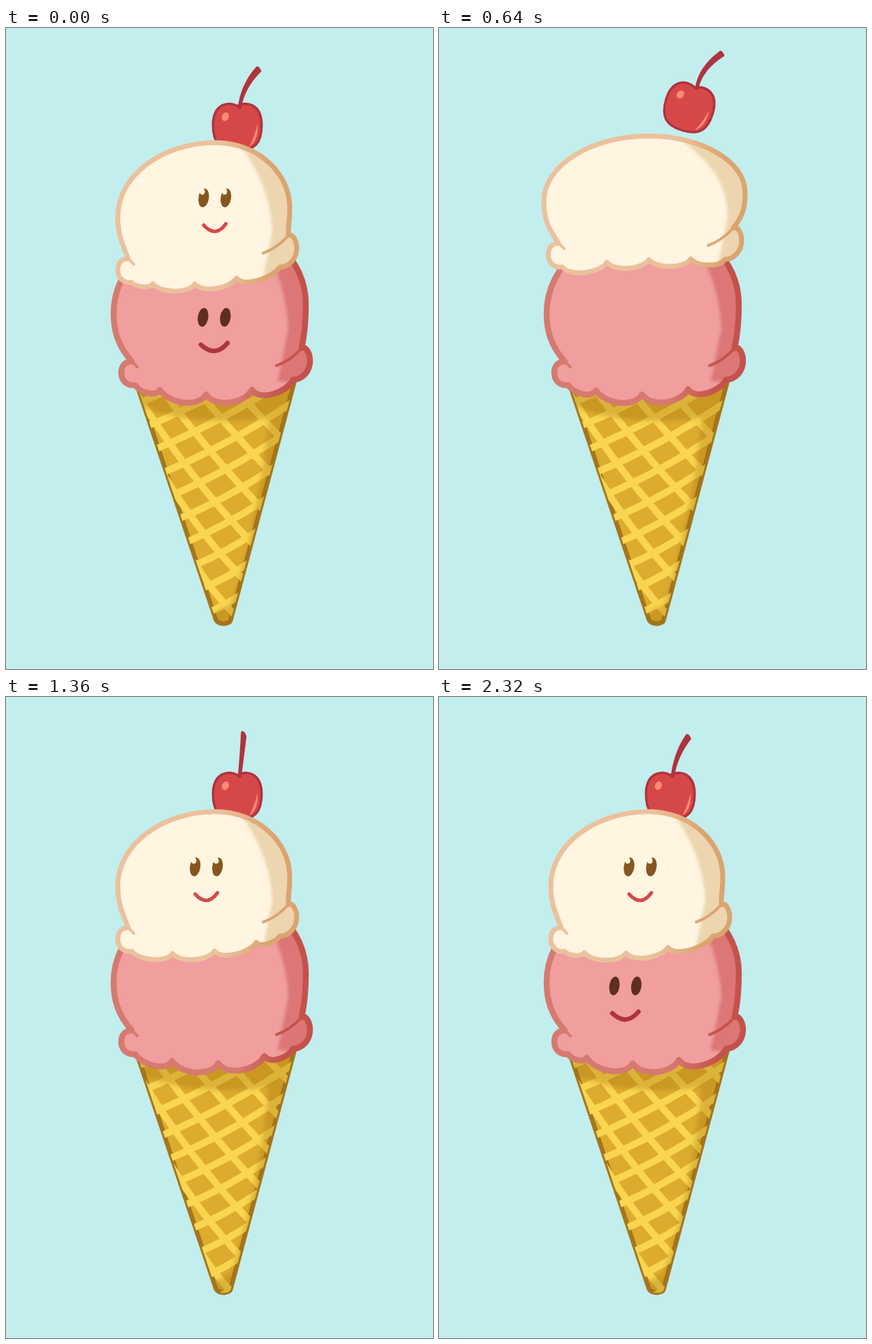
These frames come from a looping animation (611 by 917 pixels, 2400 ms). An HTML page with a canvas:

```html
<!DOCTYPE html>
<html lang="en">
<head>
<meta charset="utf-8">
<title>Ice cream</title>
<style>
html, body { margin: 0; width: 100%; height: 100%; overflow: hidden; background: #c2eeee; }
canvas { display: block; }
</style>
</head>
<body>
<canvas id="c" width="611" height="917"></canvas>
<script>
const ctx = document.getElementById('c').getContext('2d');
const STEP = 80, COUNT = 30, TAU = Math.PI * 2;

const VANILLA = {
  fill: '#fff5e1', shade: '#ecd5af', line: '#ebc19c', dark: '#dba46f',
  eye: '#86561f', lip: '#d64848', glint: true, spacing: 60, dip: 0.2, width: 7
};
const BERRY = {
  fill: '#f09e9e', shade: '#dc7677', line: '#d67a70', dark: '#c4524b',
  eye: '#5f2e21', lip: '#ae343f', glint: false, spacing: 66, dip: 0.26, width: 8.5
};

// Poses of the hop: step, sideways spread, drift to the right, lift
const HOP = [
  [0, 0, 0, 0], [3, 30, 4, -30], [5, 8, 19, 43],
  [8, 21, 11, 22], [9, 22, 6, -6], [12, 0, 0, 0], [COUNT, 0, 0, 0]
];

function ease(a, b, n) {
  const u = Math.min(1, Math.max(0, (n - a) / (b - a)));
  return u * u * (3 - 2 * u);
}

const bump = (n, center, width) => Math.exp(-(((n - center) / width) ** 2));

function hopAt(n) {
  const i = HOP.findIndex(key => key[0] > n), a = HOP[i - 1], b = HOP[i];
  const u = ease(a[0], b[0], n);
  return a.slice(1).map((v, k) => v + (b[k + 1] - v) * u);
}

function twoTone(look, x) {
  const g = ctx.createLinearGradient(x - 30, 0, x + 40, 0);
  g.addColorStop(0, look.line);
  g.addColorStop(1, look.dark);
  return g;
}

// A dome is its left, top and right point.
function domeCurve(p, [lx, ly, tx, ty, rx, ry], start, end) {
  const k = 0.55;
  p.moveTo(...start);
  p.bezierCurveTo(lx + 6, start[1] - 22, lx, ly + 25, lx, ly);
  p.bezierCurveTo(lx, ly + (ty - ly) * k, tx + (lx - tx) * k, ty, tx, ty);
  p.bezierCurveTo(tx + (rx - tx) * k, ty, rx, ry + (ty - ry) * k, rx, ry);
  p.bezierCurveTo(rx, ry + 20, rx - 2, end[1] - 18, ...end);
}

// Arcs between evenly spaced cusps; a negative dip bulges up.
function scallops(p, from, to, sag, dip, spacing, turn) {
  const dir = Math.sign(to[0] - from[0]);
  const xs = [];
  for (let x = (turn % spacing + spacing) % spacing; x < 611; x += spacing)
    if ((x - from[0]) * dir > 22 && (to[0] - x) * dir > 22) xs.push(x);
  if (dir < 0) xs.reverse();
  let [px, py] = from;
  for (const x of [...xs, to[0]]) {
    const u = (x - from[0]) / (to[0] - from[0]);
    const y = from[1] + (to[1] - from[1]) * u + sag * Math.sin(Math.PI * u);
    const step = x - px, d = Math.abs(step) * dip * 1.15;
    p.bezierCurveTo(px + step * 0.15, py + d, x - step * 0.2, y + d, x, y);
    px = x;
    py = y;
  }
}

function paintShade(shape, [, , tx, ty, rx, ry], look) {
  ctx.save();
  ctx.clip(shape);
  ctx.filter = 'blur(2px)';
  ctx.fillStyle = look.shade;
  ctx.beginPath();
  ctx.moveTo(tx + 28, ty - 6);
  ctx.bezierCurveTo(rx - 45, ty + 35, rx - 26, ry - 10, rx - 25, ry + 35);
  ctx.lineTo(rx - 40, ry + 110);
  ctx.lineTo(rx + 60, ry + 120);
  ctx.lineTo(rx + 60, ty - 20);
  ctx.fill();
  ctx.restore();
}

function paintShadow(shape, look) {
  ctx.save();
  ctx.clip(shape);
  ctx.fillStyle = look.shade;
  ctx.beginPath();
  ctx.moveTo(150, 340);
  ctx.bezierCurveTo(235, 315, 335, 310, 405, 400);
  ctx.lineTo(450, 270);
  ctx.lineTo(150, 270);
  ctx.fill();
  ctx.restore();
}

// The rim is its left and right lobe.
function scoop(dome, [ax, ay, bx, by], look, sag, turn, shadowed) {
  const start = [ax + 15, ay - 16], end = [bx - 12, by - 18];
  const right = [bx - 24, by + 27], left = [ax + 20, ay + 18];
  const p = new Path2D();
  domeCurve(p, dome, start, end);
  p.bezierCurveTo(bx - 6, by - 22, bx, by - 10, bx, by);
  p.bezierCurveTo(bx, by + 16, bx - 12, by + 27, ...right);
  scallops(p, right, left, sag, look.dip, look.spacing, turn);
  p.bezierCurveTo(ax + 7, ay + 19, ax, ay + 11, ax, ay);
  p.bezierCurveTo(ax, ay - 10, ax + 6, ay - 16, ...start);
  p.closePath();
  ctx.fillStyle = look.fill;
  ctx.fill(p);
  paintShade(p, dome, look);
  if (shadowed) paintShadow(p, look);
  ctx.lineWidth = look.width;
  ctx.strokeStyle = twoTone(look, dome[4] - 70);
  ctx.stroke(p);
  ctx.beginPath();
  ctx.moveTo(...start);
  ctx.lineTo(start[0] + 8, start[1] + 8);
  ctx.moveTo(...end);
  ctx.quadraticCurveTo(end[0] - 16, end[1] + 18, end[0] - 36, end[1] + 25);
  ctx.lineWidth = 4;
  ctx.stroke();
}

// Tipped-back scoop with its hollow underside showing
function liftedScoop(dome, [ax, ay, bx, by], look) {
  const top = new Path2D(), rim = new Path2D(), hole = new Path2D();
  domeCurve(top, dome, [ax + 27, ay - 30], [bx - 28, by - 30]);
  rim.moveTo(ax, ay + 5);
  rim.bezierCurveTo(ax + 2, ay - 28, ax + 22, ay - 42, ax + 50, ay - 35);
  scallops(rim, [ax + 50, ay - 35], [bx - 28, by - 30], -14, -0.15, 64, 293);
  rim.bezierCurveTo(bx - 8, by - 30, bx, by - 10, bx, by);
  rim.bezierCurveTo(bx, by + 20, bx - 18, by + 34, bx - 48, by + 26);
  rim.lineTo(ax + 32, ay + 20);
  rim.bezierCurveTo(ax + 18, ay + 26, ax, ay + 24, ax, ay + 5);
  rim.closePath();
  hole.moveTo(ax + 20, ay + 9);
  hole.bezierCurveTo(ax + 70, ay - 45, bx - 60, by - 50, bx - 22, by - 2);
  hole.bezierCurveTo(bx - 18, by + 12, bx - 30, by + 22, bx - 52, by + 24);
  hole.lineTo(ax + 36, ay + 20);
  ctx.lineWidth = 6;
  for (const p of [top, rim]) {
    ctx.fillStyle = look.fill;
    ctx.fill(p);
    paintShade(p, dome, look);
    ctx.strokeStyle = twoTone(look, dome[4] - 50);
    ctx.stroke(p);
  }
  ctx.fillStyle = twoTone(look, dome[4] - 20);
  ctx.fill(hole);
}

// A face on a turning ball; roll tips it back, open is the mouth.
function face(dome, look, cx, y, angle, roll = 0, open = 0) {
  const turn = Math.cos(angle), mouthY = 38;
  if (turn < 0.12) return;
  const clip = new Path2D();
  domeCurve(clip, dome, [dome[0] + 20, dome[1] + 110], [dome[4] - 10, dome[5] + 110]);
  ctx.save();
  ctx.clip(clip);
  ctx.translate(cx + 115 * Math.sin(angle), y);
  ctx.save();
  ctx.rotate(roll);
  ctx.scale(turn, 1);
  for (const side of [-16, 16]) {
    ctx.fillStyle = look.eye;
    ctx.beginPath();
    ctx.ellipse(side, 0, 7.5, 13.5, 0.15, 0, TAU);
    ctx.fill();
    if (!look.glint) continue;
    ctx.fillStyle = look.fill;
    ctx.beginPath();
    ctx.ellipse(side - 2, -9, 3.8, 4.5, 0, 0, TAU);
    ctx.fill();
  }
  ctx.restore();
  ctx.translate(-mouthY * Math.sin(roll), mouthY * Math.cos(roll));
  ctx.rotate(-roll * 0.3 - 0.06);
  ctx.scale(Math.sqrt(turn), 1);
  const w = (look.glint ? 16 : 19) + open * 5;
  ctx.beginPath();
  ctx.moveTo(-w, 0);
  ctx.quadraticCurveTo(0, 20 - 16 * open, w, 0);
  ctx.quadraticCurveTo(0, 20 + 13 * open, -w, 0);
  ctx.fillStyle = ctx.strokeStyle = look.lip;
  ctx.lineWidth = look.glint ? 5 - open : 6.5;
  ctx.fill();
  ctx.stroke();
  ctx.restore();
}

function cherry(x, y, w, h, tilt, lean, length) {
  const half = new Path2D();
  ctx.save();
  ctx.translate(x, y);
  ctx.rotate(tilt);
  half.moveTo(0, -0.45 * h);
  half.bezierCurveTo(0.18 * w, -0.57 * h, 0.5 * w, -0.52 * h, 0.5 * w, -0.05 * h);
  half.bezierCurveTo(0.5 * w, 0.35 * h, 0.36 * w, 0.5 * h, 0, 0.5 * h);
  const body = new Path2D(half);
  body.addPath(half, new DOMMatrix([-1, 0, 0, 1, 0, 0]));
  ctx.strokeStyle = '#ae343f';
  ctx.lineWidth = 7;
  ctx.stroke(body);
  ctx.fillStyle = '#d64848';
  ctx.fill(body);
  ctx.fillStyle = '#fe8a74';
  ctx.beginPath();
  ctx.ellipse(-w * 0.26, -h * 0.24, w * 0.075, h * 0.1, 0.4, 0, TAU);
  ctx.fill();
  ctx.beginPath();
  ctx.moveTo(w * 0.44, -h * 0.08);
  ctx.quadraticCurveTo(w * 0.46, h * 0.3, w * 0.26, h * 0.44);
  ctx.quadraticCurveTo(w * 0.38, h * 0.2, w * 0.44, -h * 0.08);
  ctx.fill();
  ctx.restore();

  const bx = x + 3 + Math.sin(tilt) * h * 0.45, by = y - h * 0.45;
  const tx = bx + Math.sin(lean) * length, ty = by - Math.cos(lean) * length;
  const my = (by + ty) / 2;
  ctx.fillStyle = '#ae343f';
  ctx.beginPath();
  ctx.moveTo(bx - 2.5, by + 2);
  ctx.quadraticCurveTo(bx + 1, my - 4, tx - 4, ty - 2);
  ctx.quadraticCurveTo(tx, ty - 6, tx + 4, ty + 4);
  ctx.quadraticCurveTo(bx + 7, my, bx + 2.5, by + 2);
  ctx.fill();
}

// A waffle ridge starting on the left edge at height y, scaled towards the tip
function ridge(y, end, mid) {
  const r = 886 - y;
  if (r <= 0) return;
  ctx.save();
  ctx.translate(312, 886);
  ctx.scale(r, r);
  ctx.beginPath();
  ctx.moveTo(-0.35, -1);
  ctx.quadraticCurveTo(...mid, ...end);
  ctx.lineWidth = 10 / r;
  ctx.stroke();
  ctx.restore();
}

function cone(turn) {
  const p = new Path2D('M186 512L299 848Q303 854 312 854Q322 853 323 848L416 500Z');
  const phase = turn % 1;
  ctx.save();
  ctx.clip(p);
  ctx.fillStyle = '#ddac2f';
  ctx.fill(p);
  ctx.lineWidth = 10;
  ctx.strokeStyle = '#a5761b';
  ctx.stroke(p);
  ctx.strokeStyle = '#f9d550';
  for (let k = -3; k < 9; k++) {
    ridge(603 + 33 * (k + phase), [0.39, -1.4], [0.03, -1.16]);
    ridge(515 + 125 * (k - phase), [0.11, -0.4], [-0.15, -0.67]);
  }
  ctx.filter = 'blur(3px)';
  ctx.fillStyle = 'rgba(160,110,10,.32)';
  ctx.beginPath();
  ctx.moveTo(170, 490);
  ctx.lineTo(190, 540);
  ctx.quadraticCurveTo(270, 572, 376, 558);
  ctx.quadraticCurveTo(362, 700, 322, 825);
  ctx.lineTo(300, 835);
  ctx.lineTo(300, 870);
  ctx.lineTo(440, 870);
  ctx.lineTo(440, 490);
  ctx.fill();
  ctx.restore();
  ctx.lineWidth = 3;
  ctx.strokeStyle = '#a5761b';
  ctx.stroke(p);
}

function drawVanilla(n, spread, drift, lift, lifted) {
  const top = 164 - lift + spread * 0.6, rise = Math.max(lift, -10);
  const dome = [160 + drift - spread, 270 - lift, 300, top, 406 + drift + spread, 257 - lift];
  const rim = [
    160 + drift - spread * 0.7, 346 - rise,
    416 + drift * 0.6 + spread * 0.5, 315 - rise * 0.5
  ];
  // One spin to the left while hopping, one back to the right later
  const spin = ease(3, 12, n) - ease(16, COUNT, n);

  const squash = bump(n, 5, 1.2) + bump(n, 12, 1);
  const u = (n - 7.5) / 3.5, air = Math.max(0, 148 * u * (1 - u));
  const tilt = drift * 0.018 + air * 0.005;
  const sway = 0.36 * bump(Math.min(n, COUNT - n), 0, 2);
  cherry(331 + drift * 1.1 + air * 0.8, top - 22 + 26 * squash - air,
    66 + 26 * squash, 63 - 20 * squash, tilt, 0.1 + sway + 1.8 * tilt, 62 - 18 * squash);

  if (lifted) liftedScoop(dome, [rim[0] - 12, rim[1], rim[2] + 8, rim[3] + 6], VANILLA);
  else scoop(dome, rim, VANILLA, 12 - spread * 0.8, 270 - 154 * spin);
  const roll = Math.max(0, lift) * 0.014;
  face(dome, VANILLA, 285, 243 - lift - 75 * roll, 0.12 - (TAU + 0.2) * spin, roll, bump(n, 11.5, 2));
}

function drawBerry(n, lift, lifted) {
  const u = n / COUNT, sink = Math.max(0, lift - 23);
  const dome = [154, 408 + sink * 0.5, 308 - sink, 280 + sink, 429, 395 + sink];
  scoop(dome, [165, 493, 435, 476], BERRY, 17, 286 + 4 * BERRY.spacing * u, lifted);
  const angle = 0.06 + TAU * u + 0.26 * Math.sin(TAU * u) - 0.45 * (1 - Math.cos(TAU * u));
  face(dome, BERRY, 291, 414 - 14 * Math.sin(angle) ** 2, angle);
}

function draw(n) {
  const [spread, drift, lift] = hopAt(n), lifted = lift > 28;
  ctx.fillStyle = '#c2eeee';
  ctx.fillRect(0, 0, 611, 917);
  cone(n * 0.75);
  if (!lifted) drawBerry(n, lift, lifted);
  drawVanilla(n, spread, drift, lift, lifted);
  if (lifted) drawBerry(n, lift, lifted);
}

ctx.lineCap = ctx.lineJoin = 'round';
const begin = performance.now();
function tick() {
  draw(Math.floor((performance.now() - begin) / STEP) % COUNT);
  requestAnimationFrame(tick);
}
tick();
</script>
</body>
</html>
```
